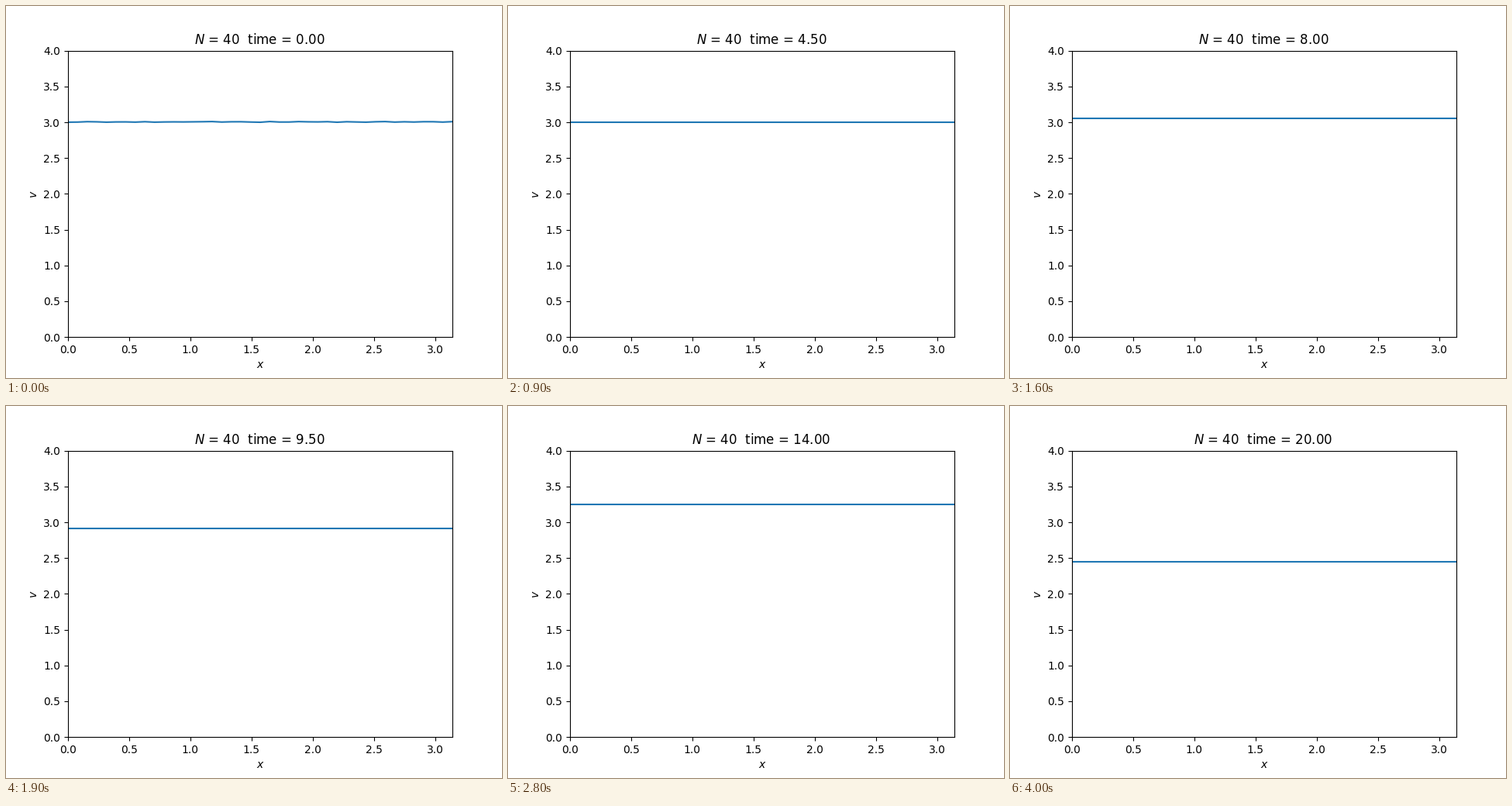
A matplotlib script that plays this animation: 640 px wide and 480 px high, repeating every 4.1 s.

```python
import numpy as np
import matplotlib.pyplot as plt
from matplotlib.animation import FuncAnimation

N = 40
FRAMES = 41
DT = 0.5
V_REST = 3.0
GROWTH, OMEGA, AMP, T_ZERO = 0.18, 0.76, 0.061, 4.5
DAMPING = 5.0

x = np.linspace(0, np.pi, N + 1)


def linear(t):
    """Small oscillation about rest, growing exponentially."""
    tau = t - T_ZERO
    return AMP * np.exp(GROWTH * tau) * np.sin(OMEGA * tau)


# Random start within 0.01 above rest
noise = 0.01 * np.random.default_rng(3).random(N + 1) - linear(0)

# Saturated swing: slow rise, fast drop
key_t = np.array([13, 14, 15.6, 17, 18, 19, 20])
key_v = np.array([0.05, 0.249, 0.396, 0.162, -0.465, -0.79, -0.552])
slope = np.gradient(key_v, key_t)


def swing(t):
    """Smooth cubic curve through the key points."""
    k = min(np.searchsorted(key_t, t, side="right"), len(key_t) - 1) - 1
    h = key_t[k + 1] - key_t[k]
    s = (t - key_t[k]) / h
    ease = s * s * (3 - 2 * s)
    bend = s * (1 - s) * ((1 - s) * slope[k] - s * slope[k + 1])
    return key_v[k] + ease * (key_v[k + 1] - key_v[k]) + h * bend


def profile(t):
    mean = linear(t) if t < key_t[0] else swing(t)
    return V_REST + mean + noise * np.exp(-DAMPING * t)


fig, ax = plt.subplots(figsize=(6.4, 4.8), dpi=100)
line, = ax.plot(x, profile(0))
ax.set_xlim(0, np.pi)
ax.set_ylim(0, 4)
ax.set_xlabel("$x$")
ax.set_ylabel("$v$")
title = ax.set_title("", x=0.498)


def update(i):
    t = i * DT
    line.set_ydata(profile(t))
    title.set_text(f"$N$ = {N}  time = {t:.2f}")
    return line, title


anim = FuncAnimation(fig, update, frames=FRAMES, interval=100,
                     repeat=True, repeat_delay=0)
plt.show()
```
